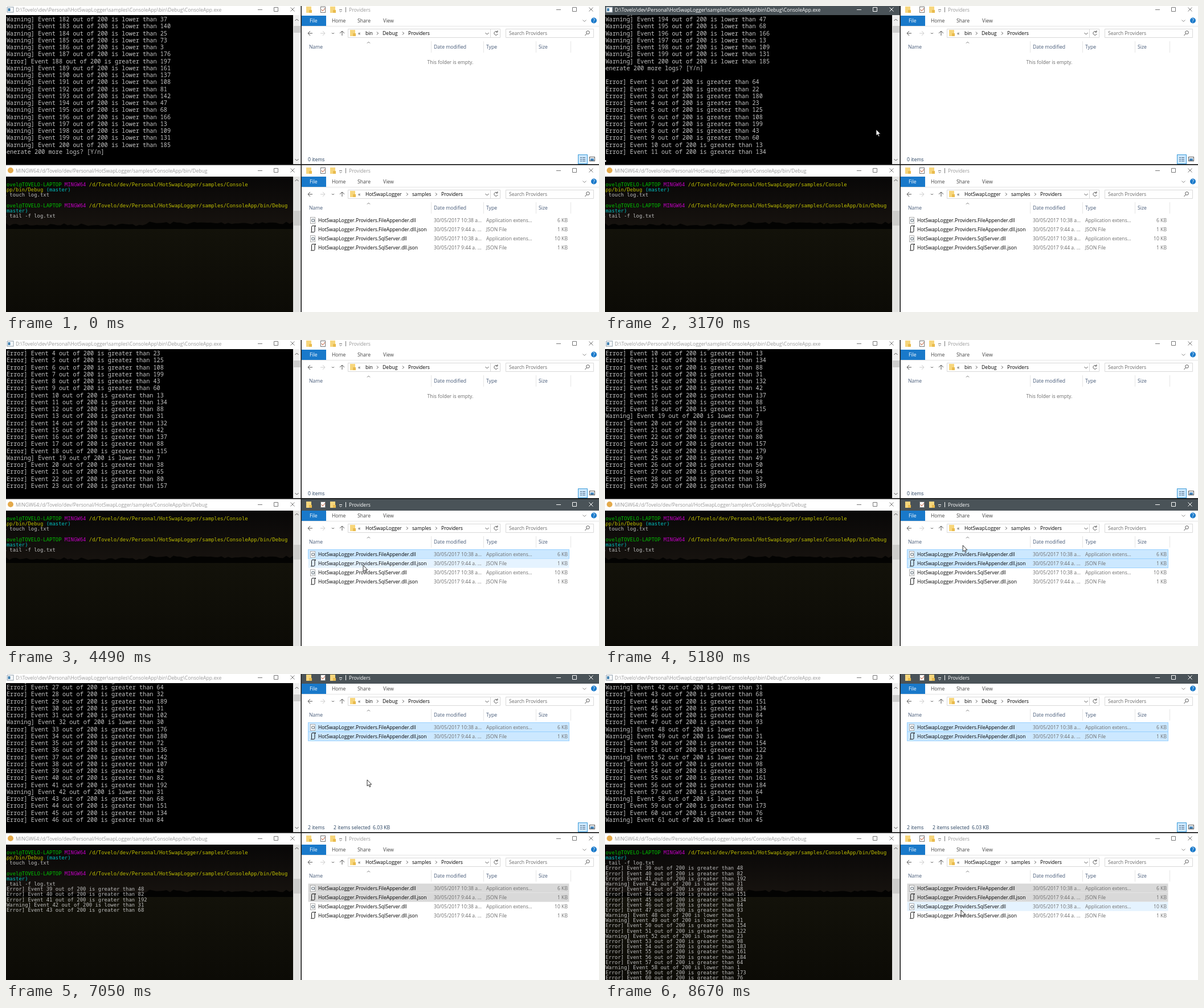
Recreate the animation shown at these times as an HTML page. Size 1041 by 538 pixels, loop 8.75 s.

```html
<!DOCTYPE html>
<html lang="en">
<head>
<meta charset="utf-8">
<title>Hot swapping log providers</title>
<style>
html, body { margin: 0; width: 100%; height: 100%; overflow: hidden; background: #fff; }
svg { display: block; }
text { font: 8.65px "Open Sans", "Noto Sans", sans-serif; white-space: pre; }
.con text { font: 10.22px "Noto Sans Mono", monospace; fill: #c4c4c4; }
.term text { font: 8.92px "DejaVu Sans Mono", monospace; fill: #bfbfbf; }
.line { fill: none; stroke-width: 1; }
.bar { fill: #fff; }
.cap { fill: #999; }
.btn { stroke: #777; }
.active .bar { fill: #4a5358; }
.active .cap { fill: #fff; }
.active .btn { stroke: #fff; }
</style>
</head>
<body>
<svg id="stage" width="1041" height="538" viewBox="0 0 1041 538"></svg>
<script>
const LOOP = 8750, TICK = 77.43, LEAD = 12;
const CON_LH = 12.26, TERM_LH = 9.19, ROW_H = 16.1, LOWER = 283;

const before = [37, 140, 25, 73, 3, 176, 197, 161, 137, 108, 81, 142, 47, 68, 166, 13, 109, 131, 185];
// Negative values are warnings.
const values = [
  64, 22, 180, 23, 125, 108, 199, 43, 60, 13, 134, 88, 31, 132, 42, 137, 88, 115, -7, 38,
  65, 80, 157, 179, 49, 50, 64, 32, 189, 31, 102, -30, 176, 180, 72, 136, 142, 107, 48, 82,
  192, -31, 68, 151, 134, 84, 93, -1, -31, 154, 122, -23, 98, 183, 161, 184, 64, -1, 173, 76, -45];
// Ticks at which no event is printed.
const pauses = [31, 35, 38, 42, 45, 49, 52, 55, 59, 62, 66, 70, 73, 77, 81, 84, 87, 90, 94, 98, 101, 105, 108, 111];
const flushes = [[112, 60], [99, 52], [86, 43]];
const blips = { 3: [478, 170], 9: [166, 33] };
const path = [
  [12, 526, 282], [14, 170, 4], [38, 170, 4], [41, 476, 217], [45, 622, 396], [47, 630, 377],
  [52, 630, 377], [54, 627, 396], [66, 627, 396], [72, 634, 186], [105, 634, 186], [111, 625, 415], [114, 625, 415]];

const text = (x, y, s, fill = "#000", extra = "") => `<text x="${x}" y="${y}" fill="${fill}" ${extra}>${s}</text>`;
const rect = (x, y, w, h, fill, extra = "") => `<rect x="${x}" y="${y}" width="${w}" height="${h}" fill="${fill}" ${extra}/>`;
const line = (d, stroke, extra = "") => `<path class="line" d="${d}" stroke="${stroke}" ${extra}/>`;
const event = (n, v) => v < 0
  ? `[Warning] Event ${n} out of 200 is lower than ${-v}`
  : `[Error] Event ${n} out of 200 is greater than ${v}`;

const buttons = (x, y) => `<path class="line btn" d="M${x - 4} ${y + .5}h8M${x + 24.5} ${y - 3.5}h7v7h-7zM${x + 53.5} ${y - 3.5}l7 7m0-7l-7 7"/>`;
const folder = (x, y) => rect(x, y, 9, 11, "#f7d67c") + rect(x + 5, y + 6, 5, 5, "#e9bb4e");
const arrows = (up, down) => line(`M507.5 ${up + 2}l3-3l3 3M507.5 ${down - 2}l3 3l3-3`, "#505050", 'stroke-width="1.3"');

function consoleWindow() {
  const lines = before.map((v, i) => event(182 + i, i === 6 ? v : -v))
    .concat("Generate 200 more logs? [Y/n]", "", values.map((v, i) => event(i + 1, v)));
  return `<g id="con">
    <rect class="bar" width="518" height="16"/>
    ${rect(2, 2, 11, 9, "#fff", 'stroke="#8a9aa5"')}${rect(3.5, 4, 4, 5, "#3f7fae")}
    <text class="cap" x="17" y="9.8">${String.raw`D:\Tovelo\dev\Personal\HotSwapLogger\samples\ConsoleApp\bin\Debug\ConsoleApp.exe`}</text>
    ${buttons(446, 6)}
    ${rect(0, 16, 504, 263, "#000")}
    <g clip-path="url(#conClip)"><g class="con" id="conLines">
      ${lines.map((s, i) => text(-5.2, 27 + i * CON_LH, s)).join("")}
    </g></g>
    ${rect(0, 271, 2, 3, "#d0d0d0", 'id="caret"')}
    ${rect(504, 16, 14, 263, "#f0f0f0")}${rect(505, 35, 12, 12, "#cdcdcd", 'id="thumb"')}${arrows(24, 271)}
  </g>`;
}

function trees() {
  let seed = 7, d = "M0 392V381";
  const rnd = () => (seed = seed * 16807 % 2147483647) / 2147483647;
  for (let x = 0; x <= 504; x += 6) {
    const tall = x > 240 ? 379 : 382;
    d += `L${x} ${(tall + rnd() * 5).toFixed(1)}`;
  }
  return `<path d="${d}V392Z" fill="#030302"/>`;
}

function terminal() {
  const span = (s, fill) => `<tspan style="fill:${fill}">${s}</tspan>`;
  const cyan = s => span(s, "#00bfbf");
  const prompt = dir => span("tovel@TOVELO-LAPTOP", "#00bf00") + " " + span("MINGW64", "#bf00bf") + " " +
    span("/d/Tovelo/dev/Personal/HotSwapLogger/samples/" + dir, "#bfbf00");
  const rows = [
    prompt("Console"), span("App/bin/Debug", "#bfbf00") + " " + cyan("(master)"), "$ touch log.txt", "",
    prompt("ConsoleApp/bin/Debug"), cyan("(master)"), "$ tail -f log.txt",
    ...values.slice(38, 60).map((v, i) => event(39 + i, v))];
  return `<g>
    ${rect(0, 280, 518, 20, "#fff")}<circle cx="8" cy="289" r="5" fill="#e3a94a"/>
    <text class="cap" x="17" y="292.8">MINGW64:/d/Tovelo/dev/Personal/HotSwapLogger/samples/ConsoleApp/bin/Debug</text>
    ${buttons(446, 289)}
    ${rect(0, 300, 504, 88, "url(#sky)")}${rect(0, 388, 504, 150, "url(#field)")}${trees()}
    <g clip-path="url(#termClip)"><g class="term" id="termLines">
      ${rows.map((s, i) => text(-4.4, 316.8 + i * TERM_LH, s)).join("")}
    </g></g>
    ${rect(504, 300, 14, 238, "#e4e4e2")}${rect(505, 360, 12, 26, "#cdcdcb")}
    ${line("M507.5 308l3-3l3 3", "#505050")}
  </g>`;
}

const files = [
  ["FileAppender.dll", "6 KB"], ["FileAppender.dll.json", "1 KB"],
  ["SqlServer.dll", "10 KB"], ["SqlServer.dll.json", "1 KB"]];

function fileRow([name, size], i) {
  const y = 86 + i * ROW_H, base = y + 11, json = name.endsWith("json");
  const icon = json
    ? line(`M535 ${y + 12.5}h5.5q1.5 0 1.5-2v-7.500q0-1.500 2-1.500h-6q-1.500 0-1.500 2v8`, "#111", 'stroke-width="1.4"')
    : rect(534.5, y + 2.5, 8, 11, "#fff", 'stroke="#9a9a9a" stroke-width=".8"') +
      `<circle cx="539" cy="${y + 8}" r="2.300" fill="none" stroke="#7f8b94" stroke-width="1.300"/>`;
  return `<g class="row">${rect(530.5, y - .5, 458, 16, "none", 'class="back"')}${icon}
    ${text(548, base, "HotSwapLogger.Providers." + name)}
    ${text(751, base, json ? "30/05/2017 9:44 a. ..." : "30/05/2017 10:38 a...", "#6d6d6d")}
    ${text(843, base, json ? "JSON File" : "Application extens...", "#6d6d6d")}
    ${text(986, base, size, "#6d6d6d", 'text-anchor="end"')}</g>`;
}

function explorer(id, dy, top, crumbs, list) {
  const tabs = [[572, "Home"], [617, "Share"], [662, "View"]];
  const heads = [[532, "Name"], [751, "Date modified"], [843, "Type"], [935, "Size"]];
  return `<g id="${id}" transform="translate(0 ${dy})">
    ${rect(519, top, 522, 538, "#fff")}
    <rect class="bar" x="519" y="${top}" width="522" height="${17 - top}"/>
    ${folder(527, 1)}${folder(569, 1)}
    ${rect(552.5, 1.5, 8, 10, "#fff", 'stroke="#777"')}${line("M554 6l2 3l4-5", "#c0562f")}
    <path class="line btn" d="M585 6.500h5M585.500 8.500l2 2l2-2M596.500 2v9"/>
    <text class="cap" x="602" y="9.800">Providers</text>
    ${buttons(970, 6)}
    ${rect(519, 17, 43, 18, "#1979ca")}${text(533, 29, "File", "#fff")}
    ${tabs.map(([x, s]) => text(x, 29, s, "#444")).join("")}
    ${line("M1012.5 24.5l3 3l3-3", "#888")}
    <circle cx="1032" cy="25.500" r="5" fill="#1979ca"/>${text(1030.2, 28.7, "?", "#fff", 'font-weight="bold"')}
    ${line("M519 35.500h522", "#e4e4e4")}
    ${line("M538 48h-8m4-4l-4 4l4 4M590 52v-8m-4 4l4-4l4 4", "#555", 'stroke-width="1.300"')}
    ${line("M552 48h8m-4-4l4 4l-4 4", "#ccc")}${line("M572 47l2 2l2-2", "#666")}
    ${line("M600.500 40.500h267v15h-267zM850.500 40.500v15M877.500 40.500h154v15h-154z", "#d9d9d9")}
    ${folder(604, 42)}${text(618, 51, "«", "#333")}
    ${crumbs.map(([x, s]) => text(x, 51, s)).join("")}
    ${crumbs.slice(1).map(([x]) => line(`M${x - 10} 45.500l2.500 2.500l-2.500 2.500`, "#555")).join("")}
    ${line("M841.500 47l3 3l3-3M862.500 45.500a3.300 3.300 0 1 0 .8 3.500M863 43v3h-3", "#555")}
    ${text(883, 51, "Search Providers", "#6d6d6d")}
    <circle cx="1021.500" cy="46.500" r="2.800" fill="none" stroke="#555"/>${line("M1019.5 48.5l-3 3.500", "#555", 'stroke-width="1.400"')}
    ${line("M634 65.500l2.500-2.500l2.500 2.500", "#777")}
    ${heads.map(([x, s]) => text(x, 75, s, "#465a78")).join("")}
    ${line("M746.500 62v20M838.500 62v20M930.500 62v20M991.500 62v20", "#e5e5e5")}
    <g class="list">${list.map(fileRow).join("")}</g>
  </g>`;
}

function statusBar() {
  return `<g>
    ${text(780, 101.7, "This folder is empty.", "#6d6d6d", 'text-anchor="middle" id="empty"')}
    ${text(530, 272.5, "0 items", "#26405f", 'id="count"')}
    <g id="picked">${text(575, 272.5, "2 items selected", "#26405f")}${text(644, 272.5, "6.03 KB", "#26405f")}</g>
    ${rect(1004.5, 261.5, 16, 16, "#cce8ff", 'stroke="#3c9bd8"')}
    ${line("M1008 266.500h3m1 0h5M1008 269.500h3m1 0h5M1008 272.500h3m1 0h5", "#4a6078")}
    ${rect(1024.5, 265.5, 9, 7, "#fff", 'stroke="#555"')}${rect(1026, 268, 6, 4, "#4a86b8")}
  </g>`;
}

const gradient = (id, a, b) => `<linearGradient id="${id}" x2="0" y2="1"><stop stop-color="${a}"/><stop offset="1" stop-color="${b}"/></linearGradient>`;
const $ = s => document.querySelector(s);
const all = s => [...document.querySelectorAll(s)];

$("#stage").innerHTML = `<defs>
    ${gradient("sky", "#080707", "#17130f")}${gradient("field", "#13120a", "#0c0b06")}
    <clipPath id="conClip">${rect(0, 16, 504, 262, "#000")}</clipPath>
    <clipPath id="termClip">${rect(0, 300, 504, 238, "#000")}</clipPath>
  </defs>` +
  consoleWindow() + terminal() +
  explorer("upper", 0, 0, [[631, "bin"], [661, "Debug"], [706, "Providers"]], files.slice(0, 2)) + statusBar() +
  explorer("lower", LOWER, -4, [[631, "HotSwapLogger"], [713, "samples"], [764, "Providers"]], files) +
  rect(517.5, 0, 1.5, 538, "#111") + rect(0, 278, 1041, 1.7, "#111") +
  `<path id="mouse" d="M0 0V11L2.500 8.700L4.300 12.600L6 11.900L4.300 8.100H7.700Z" fill="#fff" stroke="#000" stroke-width=".8"/>`;

const conLines = all("#conLines text"), termLines = all("#termLines text");
const upperRows = all("#upper .back"), lowerRows = all("#lower .back");
const show = (el, on) => el.style.display = on ? "" : "none";
const looks = {
  none: ["none", "none"], hover: ["#e5f3ff", "none"],
  picked: ["#cce8ff", "#99d1ff"], faded: ["#d9d9d9", "none"]
};

function paint(el, look) {
  const [fill, stroke] = looks[look];
  el.setAttribute("fill", fill);
  el.setAttribute("stroke", stroke);
}

function mouseAt(f) {
  if (f < path[0][0]) return blips[f];
  const i = path.findIndex(p => p[0] > f);
  const [f0, x0, y0] = path[i - 1], [f1, x1, y1] = path[i];
  const k = (f - f0) / (f1 - f0);
  return [x0 + (x1 - x0) * k, y0 + (y1 - y0) * k];
}

function printed(f) {
  return Math.max(0, f - 27) - pauses.filter(p => p <= f).length;
}

function draw(f) {
  const end = f < 27 ? 20 : 21 + printed(f);
  conLines.forEach((el, i) => show(el, i < end));
  $("#conLines").setAttribute("transform", `translate(0 ${-(end - 20) * CON_LH})`);
  $("#thumb").setAttribute("y", f < 52 ? 35 : f < 96 ? 36 : 37);
  show($("#caret"), f >= 23 && f < 50);

  const logged = (flushes.find(([at]) => f >= at) || [0, 38])[1];
  termLines.forEach((el, i) => show(el, i < 7 + logged - 38));
  $("#termLines").setAttribute("transform", `translate(0 ${logged === 60 ? -4 * TERM_LH : 0})`);

  $("#con").classList.toggle("active", f >= 14 && f < 50);
  $("#lower").classList.toggle("active", f >= 50 && f < 73);
  $("#upper").classList.toggle("active", f >= 73);

  const pasted = f >= 79;
  show($("#upper .list"), pasted);
  show($("#picked"), pasted);
  show($("#empty"), !pasted);
  $("#count").textContent = pasted ? "2 items" : "0 items";

  const pos = mouseAt(f);
  show($("#mouse"), pos);
  if (pos) $("#mouse").setAttribute("transform", `translate(${pos})`);
  const over = pos && pos[0] > 530 && pos[0] < 988 ? Math.floor((pos[1] - LOWER - 86) / ROW_H) : -1;
  upperRows.forEach(el => paint(el, "picked"));
  lowerRows.forEach((el, i) => {
    const chosen = f >= [50, 63, 999, 999][i];
    paint(el, chosen ? (f < 76 ? "picked" : "faded") : i === over ? "hover" : "none");
  });
}

let last = -1;
function tick() {
  const f = Math.floor((performance.now() % LOOP + LEAD) / TICK);
  if (f !== last) draw(last = f);
  requestAnimationFrame(tick);
}
tick();
</script>
</body>
</html>
```
